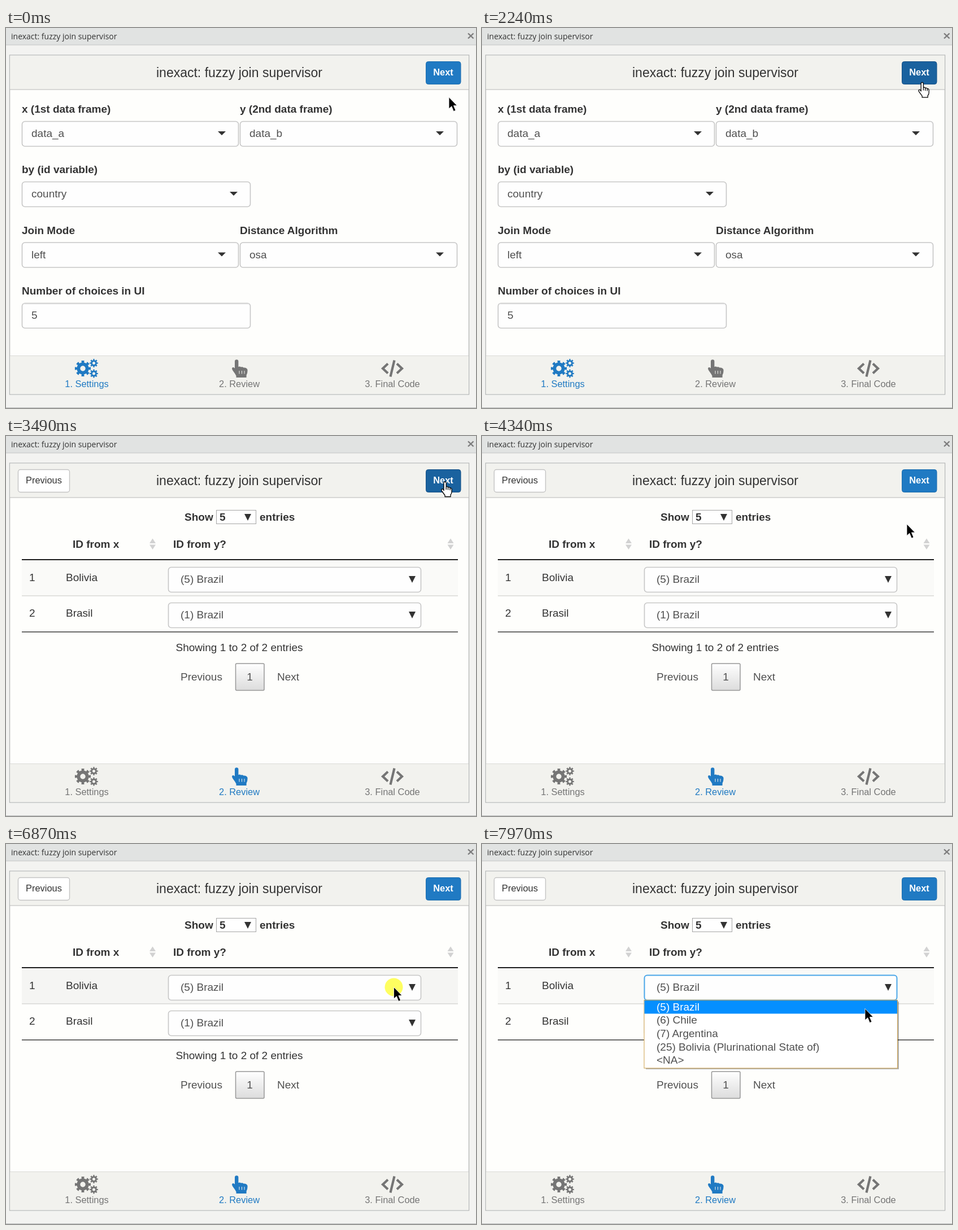
These frames come from a looping animation (832 px wide and 673 px high, 8000 ms). An HTML page:

```html
<!DOCTYPE html>
<html lang="en">
<head>
<meta charset="utf-8">
<title>inexact: fuzzy join supervisor</title>
<style>
  html, body { margin: 0; width: 100%; height: 100%; overflow: hidden; background: #f3f3f1; }
  svg { display: block; width: 832px; height: 673px; }
  text { font: 19px "Liberation Sans", Arial, sans-serif; fill: #333; white-space: pre; }
  .b { font-weight: bold; }
  .val { fill: #505050; }
  .mid { text-anchor: middle; }
  .small { font-size: 16.4px; }
  .field { fill: #fefefe; stroke: #c6c6c6; stroke-width: 1.6; }
  .tab { color: #757575; }
  .tab.on { color: #207ac3; }
  .tab text { fill: currentColor; }
  .hidden { display: none; }
  #next { fill: #207ac3; stroke: #1c6dae; }
  #next.hover { fill: #1a629f; stroke: #155086; }
  #row { fill: #fafaf8; }
  #row.hover { fill: #f5f5f3; }
  #choice.open { stroke: #4aa6e8; stroke-width: 2; }
</style>
</head>
<body>
<svg id="stage" viewBox="0 0 832 673"></svg>
<script>
const text = (x, y, s, cls = '') => `<text x="${x}" y="${y}" class="${cls}">${s}</text>`;
const rect = (x, y, w, h, attrs = '') => `<rect x="${x}" y="${y}" width="${w}" height="${h}" ${attrs}/>`;
const line = (x1, y, x2, color, w = 1) =>
  `<path d="M${x1} ${y}H${x2}" stroke="${color}" stroke-width="${w}"/>`;
const caret = (x, y, half, h, color = '#333') =>
  `<path d="M${x - half} ${y}h${2 * half}l${-half} ${h}z" fill="${color}"/>`;
const field = (x, y, w, attrs = '') => rect(x + .5, y + .5, w - 1, 44, `rx="5" class="field" ${attrs}`);

const dropdown = (x, y, w, label, value, caretX) =>
  text(x, y - 15, label, 'b') + field(x, y, w) +
  text(x + 17, y + 28, value, 'val') + caret(caretX, y + 18, 7, 7);

const sorter = x => caret(x, 190, 5.5, -8.5, '#d2d2d2') + caret(x, 192.5, 5.5, 8.5, '#d2d2d2');

const choice = (y, value, attrs = '') =>
  field(287, y, 448, attrs) + text(309, y + 28, value, 'val') + caret(719, y + 16, 6, 12);

const gear = (x, y, ring, ringWidth, teeth, teethWidth) =>
  `<g fill="none" stroke="currentColor" transform="translate(${x} ${y})">
    <circle r="${ring}" stroke-width="${ringWidth}"/>
    <circle r="${teeth}" stroke-width="${teethWidth}" pathLength="16" stroke-dasharray="1 1" stroke-dashoffset=".5"/>
  </g>`;

const tab = (id, x, label, icon) =>
  `<g id="${id}" class="tab">${icon}${text(x, 636, label, 'small mid')}</g>`;

const cogs = gear(136, 603, 7.7, 6, 11.9, 4.4) + gear(155.5, 593.5, 4, 3, 6.1, 2.6) +
  gear(155.5, 612, 4, 3, 6.1, 2.6);
const pointer = `<path fill="currentColor" d="M405 590.5a3.2 3.2 0 0 1 6.4 0V600q2.6-1.4 4.4.6
  q3-1.2 4.6 1q4-.8 5.6 1.4q1.6 1 1.6 3.4q0 5-2 8.600V619H407.500V616q-2-4-5.500-8.500
  q-3.600-5-.6-6.400q2-.8 3.600 1.600z"/>
  <path d="M413 607v5.500M417.500 607v5.500M422 607v5.500" stroke="#f2f2ee" stroke-width="1"/>`;
const brackets = `<path d="M676 594.500L667 603L676 611.500M692 594.500L701 603L692 611.500M687.500 588.500L680.500 617.500"
  fill="none" stroke="currentColor" stroke-width="4.200"/>`;

const settings =
  dropdown(28, 165, 384, 'x (1st data frame)', 'data_a', 382) +
  dropdown(414, 165, 385, 'y (2nd data frame)', 'data_b', 768) +
  dropdown(28, 272, 405, 'by (id variable)', 'country', 403) +
  dropdown(28, 379.500, 384, 'Join Mode', 'left', 382) +
  dropdown(414, 379.500, 385, 'Distance Algorithm', 'osa', 768) +
  text(28, 472, 'Number of choices in UI', 'b') + field(28, 487, 405) +
  line(31, 488.800, 430, '#e8e8e8', 1.500) + text(45, 515, '5', 'val');

const options = ['(5) Brazil', '(6) Chile', '(7) Argentina',
  '(25) Bolivia (Plurinational State of)', '&lt;NA&gt;'];
const popup =
  rect(290, 279, 448, 120, 'fill="#000" opacity=".3"') +
  rect(287, 276.500, 448.500, 120.500, 'fill="#fff" stroke="#cfa14c"') +
  rect(287.500, 277, 447.500, 23.500, 'fill="#048fff"') +
  options.map((s, i) => `<text x="309" y="${294.500 + i * 23.700}" style="fill:${i ? '#505050' : '#fff'}">${s}</text>`).join('');

const table =
  text(316, 150, 'Show', 'b') +
  rect(372.500, 131.500, 70, 24, 'fill="#fff" stroke="#a5a5a5"') +
  text(378, 150, '5', 'b') + caret(428, 138, 6, 12) + text(449, 150, 'entries', 'b') +
  text(118, 197.500, 'ID from x', 'b') + sorter(259.500) +
  text(296, 197.500, 'ID from y?', 'b') + sorter(787) +
  rect(28, 220, 772, 63, 'id="row"') +
  line(28, 219, 800, '#1c1c1c', 2) + line(28, 283, 800, '#d8d8d6', 1.300) + line(28, 347, 800, '#3a3a3a', 1.700) +
  text(41, 257, '1') + text(106, 257, 'Bolivia') + choice(232, '(5) Brazil', 'id="choice"') +
  text(41, 320, '2') + text(106, 320, 'Brasil') + choice(295, '(1) Brazil') +
  text(413, 381, 'Showing 1 to 2 of 2 entries', 'mid') +
  text(309, 433, 'Previous', 'val') + text(480, 433, 'Next', 'val') +
  rect(406.500, 403, 50.500, 47.500, 'rx="2" fill="url(#page)" stroke="#979797" stroke-width="1.500"') +
  text(431.500, 433, '1', 'mid val') +
  `<g id="popup">${popup}</g>`;

const review =
  rect(21.500, 59.500, 91, 40, 'rx="4" fill="#fff" stroke="#c4c4c4" stroke-width="1.400"') +
  text(67, 84, 'Previous', 'small mid') + `<g id="table">${table}</g>`;

const stage = document.getElementById('stage');
stage.innerHTML = `
  <defs><linearGradient id="page" x2="0" y2="1"><stop stop-color="#fff"/><stop offset="1" stop-color="#dcdcdc"/></linearGradient></defs>
  ${rect(0, 0, 832, 673, 'fill="#f3f3f1"')}
  ${rect(0, 0, 832, 30, 'fill="#e1e3e2"')}${line(0, 30, 832, '#c3c5c4')}${line(0, 672.500, 832, '#b9bbba')}
  <text x="9" y="20" style="font:14px 'Open Sans','Noto Sans',sans-serif">inexact: fuzzy join supervisor</text>
  <path d="M818 9.500l9.500 9M827.500 9.500l-9.500 9" stroke="#7c7c7c" stroke-width="2.400"/>
  ${rect(6.500, 48, 813, 601, 'fill="#fefefc" stroke="#b7b9b8" stroke-width="1.400"')}
  ${rect(7.200, 48.700, 811.600, 60, 'fill="#f2f2ee"')}${line(7, 109, 819, '#cdcdcb', 1.300)}
  ${rect(7.200, 580, 811.600, 68.300, 'fill="#f2f2ee"')}${line(7, 580.500, 819, '#d9d9d7')}
  <text x="413" y="86.500" class="mid" style="font-size:23px">inexact: fuzzy join supervisor</text>
  ${rect(743.500, 59.500, 61.500, 40, 'rx="4" id="next"')}
  <text x="774" y="84" class="small mid b" style="fill:#fff">Next</text>
  ${rect(742.500, 58.500, 63.500, 42, 'rx="2" id="focus" fill="none" stroke="#e09a1c" stroke-width="1.800"')}
  <g id="settings">${settings}</g><g id="review">${review}</g>
  ${tab('tab1', 143, '1. Settings', cogs)}${tab('tab2', 413, '2. Review', pointer)}${tab('tab3', 684, '3. Final Code', brackets)}
  <circle id="click" r="16" fill="#ff0" fill-opacity=".62"/>
  <g id="cursor">
    <path id="arrow" d="M0 0V20.500L4.800 16.200 8.400 25 12 23.500 8.400 15H14.500Z" fill="#000" stroke="#fff" stroke-width=".8"/>
    <path id="hand" d="M-2 2Q-2 0 0 0T2.200 2V9Q4.500 7.800 5.500 10Q8 9 9 11.200Q12 10.500 12 14V18Q12 21 10 23V26.500H0V24
      L-5.500 16.500Q-7 13.500-5 13T-2 15.500ZM2.200 9V14M5.500 10V14.500M9 11.200V15" fill="#fff" stroke="#000" stroke-width="1.300" stroke-linejoin="round"/>
  </g>`;

const el = Object.fromEntries([...stage.querySelectorAll('[id]')].map(e => [e.id, e]));
const show = (e, on) => e.classList.toggle('hidden', !on);

// start, end, steps, x, y: the pointer reaches (x, y) in equal jumps
const moves = [
  [520, 670, 3, 784, 119.500], [840, 910, 2, 783, 118], [1080, 1160, 2, 782, 117],
  [2010, 2470, 7, 777, 81], [3890, 4340, 7, 752, 156], [4490, 4720, 4, 728, 200],
  [4950, 5710, 11, 698, 252.500], [6260, 6570, 5, 686.500, 253.500], [7510, 7970, 7, 678, 291.500]
];

function pointerAt(t) {
  let x = 784, y = 122.500;
  for (const [start, end, steps, toX, toY] of moves) {
    if (t < start) break;
    const done = Math.min(steps, 1 + Math.floor((t - start) / (end - start) * (steps - 1))) / steps;
    x += (toX - x) * done;
    y += (toY - y) * done;
  }
  return [x, y];
}

function draw(t) {
  const [x, y] = pointerAt(t);
  const overNext = y < 100;
  const reviewing = t >= 3180, open = t >= 6970;
  show(el.settings, !reviewing);
  show(el.review, reviewing);
  show(el.table, t >= 3490);
  el.tab1.classList.toggle('on', !reviewing);
  el.tab2.classList.toggle('on', reviewing);
  el.next.classList.toggle('hover', overNext);
  show(el.focus, t >= 3020 && !reviewing);
  el.row.classList.toggle('hover', y > 219 && !open);
  el.choice.classList.toggle('open', open);
  show(el.popup, open);
  show(el.arrow, !overNext);
  show(el.hand, overNext);
  show(el.click, (t >= 2960 && t < 3090) || (t >= 6870 && t < 7050));
  const place = `translate(${x} ${y})`;
  el.cursor.setAttribute('transform', place);
  el.click.setAttribute('transform', place);
}

const begin = performance.now();
function tick() {
  draw((performance.now() - begin) % 8000);
  requestAnimationFrame(tick);
}
draw(0);
requestAnimationFrame(tick);
</script>
</body>
</html>
```
